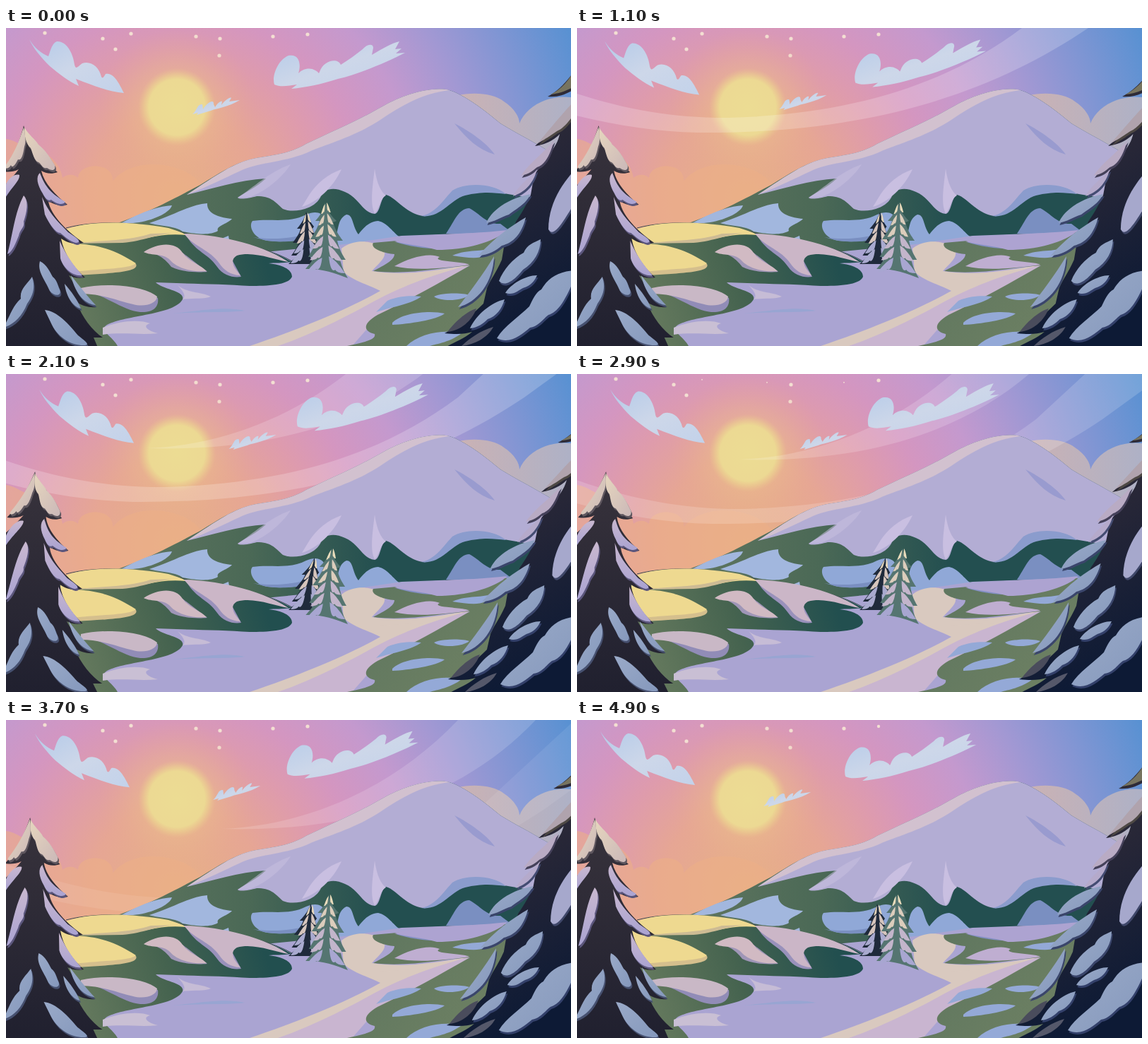
These frames come from a looping animation (800 by 450 pixels, 5 s). An HTML page:

```html
<!DOCTYPE html>
<html lang="en">
<head>
<meta charset="utf-8">
<title>Winter hills at sunset</title>
<style>
html, body { margin: 0; width: 100%; height: 100%; overflow: hidden; background: #c79bd0; }
svg { display: block; width: 100vw; height: 100vh; }
</style>
</head>
<body>
<svg viewBox="0 0 800 450" preserveAspectRatio="none">
<defs>
  <radialGradient id="sky" gradientUnits="userSpaceOnUse" cx="240" cy="240" r="610">
    <stop offset="0" stop-color="#e7b186"/><stop offset=".2" stop-color="#e6a694"/>
    <stop offset=".33" stop-color="#de9bad"/><stop offset=".43" stop-color="#d496c0"/>
    <stop offset=".56" stop-color="#c499ce"/><stop offset=".7" stop-color="#a298d3"/>
    <stop offset=".85" stop-color="#7d95d3"/><stop offset="1" stop-color="#5791d2"/>
  </radialGradient>
  <radialGradient id="sun">
    <stop offset="0" stop-color="#ecdc93"/><stop offset=".36" stop-color="#ecd993"/>
    <stop offset=".42" stop-color="#ecd08f" stop-opacity=".75"/>
    <stop offset=".5" stop-color="#ebbd8c" stop-opacity=".4"/>
    <stop offset="1" stop-color="#e8a990" stop-opacity="0"/>
  </radialGradient>
  <linearGradient id="cloud" x2="1" y2="1">
    <stop offset="0" stop-color="#b4cae9"/><stop offset=".5" stop-color="#cdd7e9"/><stop offset="1" stop-color="#c3d2ea"/>
  </linearGradient>
  <linearGradient id="haze" x2="1">
    <stop offset="0" stop-color="#cbb2b4"/><stop offset="1" stop-color="#aeb1c6"/>
  </linearGradient>
  <linearGradient id="wood" gradientUnits="userSpaceOnUse" x1="160" x2="620">
    <stop offset="0" stop-color="#5f755f"/><stop offset=".4" stop-color="#4b6956"/><stop offset=".8" stop-color="#234f50"/>
  </linearGradient>
  <linearGradient id="hill" gradientUnits="userSpaceOnUse" x1="100" y1="420" x2="370" y2="340">
    <stop offset="0" stop-color="#667a5e"/><stop offset=".5" stop-color="#45634f"/><stop offset="1" stop-color="#224f4f"/>
  </linearGradient>
  <linearGradient id="bank" x2="1" y2=".4">
    <stop offset="0" stop-color="#5d755f"/><stop offset="1" stop-color="#708263"/>
  </linearGradient>
  <linearGradient id="barkL" x2="0" y2="1">
    <stop offset="0" stop-color="#38333c"/><stop offset="1" stop-color="#20202f"/>
  </linearGradient>
  <linearGradient id="barkR" x2=".3" y2="1">
    <stop offset="0" stop-color="#3a3338"/><stop offset=".5" stop-color="#262637"/><stop offset="1" stop-color="#0d1a35"/>
  </linearGradient>
  <linearGradient id="cream" x2="1" y2="1">
    <stop offset="0" stop-color="#e6d6be"/><stop offset="1" stop-color="#cbb8b8"/>
  </linearGradient>
  <linearGradient id="lilac" x2="0" y2="1">
    <stop offset="0" stop-color="#c9b8cf"/><stop offset="1" stop-color="#aaa3d2"/>
  </linearGradient>
  <linearGradient id="ice" x2="1" y2="1">
    <stop offset="0" stop-color="#9aaac8"/><stop offset="1" stop-color="#8598bc"/>
  </linearGradient>
</defs>

<rect width="800" height="450" fill="url(#sky)"/>
<g id="stars" fill="#f3dfd2"></g>
<circle cx="242" cy="112" r="110" fill="url(#sun)"/>
<path fill="#edb088" opacity=".6" d="M0,157C12,158 20,166 30,169C58,174 76,188 80,212C88,206 96,207 102,212C103,200 117,194 132,196C146,198 152,208 151,217C162,202 185,192 212,193C245,195 268,208 276,222L160,290H0Z"/>
<path fill="url(#haze)" d="M638,96C660,90 690,92 705,104C720,114 727,126 727,135C736,112 766,94 800,98V190H740Z"/>
<g fill="#fff">
  <path id="windA" d="M-150,30C-20,95 90,128 215,127C400,122 530,75 630,0L760,-120H890L724,0C590,90 420,150 170,148C70,146 -40,120 -150,75Z"/>
  <path id="windB" d="M305,154C420,150 545,100 640,0L740,-130H840L750,0C660,95 520,160 305,154Z"/>
</g>
<g fill="url(#cloud)">
  <path class="cloud" d="M33,16C38,28 50,42 62,54C75,65 88,75 103,82L99,72C125,82 145,90 167,92C160,78 152,62 141,65C138,70 137,72 135,69C132,55 120,46 108,50C102,54 99,60 97,52C95,35 85,18 72,19C64,22 62,36 60,40C50,36 40,28 33,16Z"/>
  <path class="cloud" d="M380,80C376,68 385,45 400,39C416,36 418,52 414,64C420,58 430,55 438,60C444,63 442,66 444,62C450,45 470,42 474,52C485,45 495,38 505,30C512,22 520,22 520,28L518,38C535,28 545,22 557,19L551,30L560,29L552,36L565,35C540,48 500,65 470,72C445,80 425,84 404,86L412,80C400,82 388,84 380,80Z"/>
  <path class="cloud" d="M264,122C272,115 270,108 278,108L279,115C285,105 295,100 294,108L296,112C300,105 305,103 306,104L305,109C310,102 318,97 319,99L316,104L331,102C315,112 300,113 290,117L270,123L272,120Z"/>
</g>

<!-- mountain -->
<path fill="url(#wood)" d="M150,279C210,258 240,240 275,222C300,207 322,191 350,185C375,180 400,179 425,164C470,143 500,130 535,110C560,96 600,82 628,88C650,95 680,118 700,135C725,150 745,160 770,175L800,340H150Z"/>
<path fill="#b3add4" d="M256,236C300,207 322,191 350,185C375,180 400,179 425,164C470,143 500,130 535,110C560,96 600,82 628,88C650,95 680,118 700,135C725,150 745,160 770,175V245L705,234C690,222 650,222 635,232C620,248 605,268 590,266C565,262 550,238 538,236C530,240 530,262 522,263C505,262 500,240 480,232C465,225 450,226 445,240C435,258 405,262 392,256C380,245 375,238 355,238C345,241 330,243 328,240C340,232 355,225 368,213C330,215 290,228 256,236Z"/>
<path fill="#d2c1cf" d="M256,236C300,207 322,191 350,185C375,180 400,179 425,164C470,143 500,130 535,110C560,96 600,82 628,88C590,92 560,110 530,130C490,156 450,165 425,177C390,191 355,190 330,203C310,212 285,225 256,236Z"/>
<g fill="#c9bfe1">
  <path d="M475,200C455,207 440,220 430,235L419,253C440,247 463,226 475,200Z"/>
  <path d="M522,199C525,220 531,232 538,237C530,240 528,258 522,262C515,250 519,225 522,199Z"/>
  <path d="M328,240C350,226 372,204 403,193C390,213 365,233 345,239Z" opacity=".55"/>
</g>
<path fill="#999bcf" d="M635,135C655,145 680,162 692,179C668,172 653,157 635,135Z"/>
<path fill="#8b9ccd" d="M588,266C615,270 630,242 650,237C675,231 690,233 708,235C690,219 650,218 632,230C618,245 608,262 588,266Z"/>
<g fill="#a2b7de">
  <path d="M163,276C190,262 210,253 235,251C232,262 205,274 180,276Z"/>
  <path d="M203,276C240,264 260,250 285,248C284,262 300,268 320,270C314,277 297,280 300,287C288,295 262,290 250,288C240,280 215,280 203,276Z"/>
  <path d="M303,299L315,294L316,300Z"/>
</g>
<g fill="#90a8d7">
  <path d="M349,273C375,269 400,277 425,264C447,254 458,270 450,287C438,298 400,305 370,301C350,298 343,280 349,273Z"/>
  <path d="M460,308C474,290 466,272 482,264C492,264 490,280 499,292C506,282 516,273 527,273C541,276 548,290 558,296L520,308Z"/>
</g>
<path fill="#7a8fc1" d="M350,296C380,301 415,297 450,285C438,300 400,305 370,301ZM623,291C636,272 640,256 656,255C672,263 680,278 700,277L720,292Z"/>

<!-- valley -->
<path fill="#aaa4d2" d="M130,340L480,306L560,294L800,285V450H100Z"/>
<path fill="url(#hill)" d="M70,290C130,272 200,275 260,292C310,299 370,310 405,331C390,333 380,332 372,333C390,335 405,341 405,352C400,364 370,365 345,365C305,362 260,362 212,360C222,370 254,372 250,384C238,406 170,406 143,420C130,428 150,435 158,450H60Z"/>
<path fill="none" stroke="#3c4a50" d="M85,283C130,271 200,274 260,292C310,299 370,310 405,330"/>
<path fill="#d5bf8d" d="M72,308C120,302 155,314 184,334C190,346 145,347 100,350Z"/>
<path fill="#eed990" d="M80,287C110,273 170,272 230,283C240,286 252,290 255,293C220,289 195,300 165,303C135,304 120,302 95,305C130,306 155,314 184,333C175,341 140,340 95,345L72,320Z"/>
<path fill="#cdbb94" d="M95,305C140,300 175,301 205,291L245,290C215,290 195,302 165,304Z"/>
<path fill="#9f96b7" d="M195,318C215,316 228,330 234,338C250,346 272,346 285,345L250,318Z"/>
<path fill="#d1bac3" d="M195,317C215,304 240,302 250,318C258,330 275,335 284,344C260,346 240,338 232,328C222,318 207,323 195,317Z"/>
<path fill="#9991bb" d="M256,295C270,318 285,318 299,338C307,350 322,354 333,352L320,328Z"/>
<path fill="#cbb6c7" d="M252,291C290,292 355,302 400,331C380,328 350,315 327,322C313,330 328,345 332,350C318,350 308,342 302,333C288,313 266,310 252,291Z"/>
<path fill="#918cb7" d="M108,372C135,374 165,400 190,402C208,403 217,395 215,382L150,365Z"/>
<path fill="#c9b8c6" d="M106,368C140,360 195,364 214,380C213,391 195,395 180,391C155,385 135,376 106,376Z"/>
<path fill="#c6bcd6" d="M243,364C258,376 275,373 290,380C280,384 262,382 250,384C256,378 250,372 243,364Z"/>
<path fill="#98a5d2" d="M236,404C270,401 310,393 338,400C320,403 280,401 236,404Z"/>
<path fill="#c9bfd4" d="M137,424C160,414 190,412 204,418C190,422 205,430 215,432C190,435 165,430 137,434Z"/>
<path fill="#d9c9bf" d="M475,312C490,300 510,301 522,305C550,318 530,330 518,344C550,352 600,345 657,335C620,360 560,390 520,405C480,425 440,440 425,450H345C420,425 490,395 530,372C510,362 490,357 478,345Z"/>
<path fill="#c9b5d0" d="M657,335C600,350 555,368 515,390C465,418 415,440 385,450H490L525,410C570,385 615,365 657,335Z"/>
<path fill="url(#bank)" d="M520,304L700,288L800,300V450H483C500,446 525,442 522,433C508,430 502,420 526,406C570,385 615,360 657,336C620,338 570,350 520,344C530,338 550,330 550,320C535,319 515,312 520,304Z"/>
<path fill="#d9c9bf" d="M518,344C555,350 610,345 645,338L600,352L530,356Z"/>
<path fill="#8390c4" d="M552,303C590,315 650,320 705,291L620,300Z"/>
<path fill="#ada3d1" d="M550,302C590,289 640,294 710,286C690,304 650,314 610,314C590,308 570,307 550,302Z"/>
<path fill="#bfaed1" d="M550,337C570,325 600,317 614,324C600,331 650,330 656,335C620,340 580,344 550,337Z"/>
<g fill="#94a9d7">
  <path d="M547,417C560,403 600,399 621,404C610,413 570,419 547,420Z"/>
  <path d="M606,380C620,374 648,375 656,378C645,387 615,387 606,380Z"/>
  <path d="M567,450C585,432 620,426 645,432C630,444 610,447 600,450Z"/>
  <path d="M632,322C655,312 675,318 690,310C680,330 660,326 632,322Z"/>
  <path d="M540,386C558,378 578,379 588,380C575,390 550,394 524,402Z"/>
</g>
<g id="trees"></g>
</svg>

<script>
const NS = "http://www.w3.org/2000/svg", LOOP = 5000, STEP = 100;
const $ = s => document.querySelector(s);
const make = (tag, attrs, box) => {
  const el = document.createElementNS(NS, tag);
  for (const k in attrs) el.setAttribute(k, attrs[k]);
  return box.appendChild(el);
};

// x, y, time of the twinkle
const stars = [[55, 7, 4500], [137, 15, 1600], [155, 30, 1600], [177, 8, 2900], [269, 12, 2900],
  [303, 15, 1600], [302, 39, 4500], [378, 12, 2900], [427, 9, 4600]]
  .map(([cx, cy, at]) => ({ at, el: make("circle", { cx, cy }, $("#stars")) }));

const drift = [[15, 6], [35, -6], [55, -17]];
const clouds = document.querySelectorAll(".cloud");

// time, dx, dy, opacity
const gusts = {
  windA: [[100, -120, -190, .2], [700, -35, -47, .2], [1100, 0, 0, .2], [2100, 10, 33, .2],
    [2900, 20, 64, .16], [3700, 40, 125, .08], [4200, 60, 200, 0]],
  windB: [[1200, -320, -190, .17], [1700, -165, -82, .17], [2100, -105, -49, .17],
    [2900, -75, -33, .17], [3700, 0, 0, .15], [4300, 120, 100, 0]]
};

const C = "url(#cream)", L = "url(#lilac)", I = "url(#ice)";

// one drooping bough of snow, from its root to its tip
const bough = (x, y, dx, dy) =>
  `M${x},${y}Q${x + dx * .45},${y + dy * .2} ${x + dx},${y + dy}` +
  `Q${x + dx * .5},${y + dy} ${x + dx * .4},${y + dy * .8}Q${x + dx * .1},${y + dy} ${x},${y}Z`;

// rows of boughs widening downwards on both sides of a trunk
function boughs(n, x, top, height, width, fills) {
  const parts = [];
  for (let i = 0; i < n; i++) {
    const k = i / (n - 1), y = top + height * k, w = width * (.25 + .75 * k);
    const fill = fills[Math.round(k * (fills.length - 1))];
    parts.push([bough(x - w * .2, y, -w * .8, 14 + 6 * k), fill]);
    parts.push([bough(x + w * .15, y - 2, w * .85, 14 + 10 * k), fill]);
  }
  return parts;
}

// bend(y): sideways shift at full sway; parts: path, fill, shade
const trees = [
  { bend: y => 12 * (Math.max(0, 335 - y) / 75) ** 1.5, parts: [
    ["M425,260C428,270 432,276 436,281L434,284C438,296 442,302 446,306L440,312L446,334L400,334C406,328 409,326 412,322L404,322C410,314 413,308 415,304L406,304C413,294 416,290 417,284L412,284C420,275 423,268 425,260Z", "#1f2a3b"],
    ...boughs(5, 426, 263, 50, 23, ["#e4d5bb", "#d6c5bd", "#a9aacf"])
  ] },
  { bend: y => 9 * (Math.max(0, 353 - y) / 105) ** 1.5, parts: [
    ["M452,247C455,258 460,266 468,273L463,275C467,288 472,294 477,301L469,301C472,314 477,322 481,328L473,328C476,340 480,347 484,354C465,346 445,340 424,341C430,334 433,330 436,324L428,324C435,312 438,306 440,299L431,299C438,288 442,281 444,273L438,273C446,264 450,256 452,247Z", "#557571"],
    ...boughs(6, 453, 249, 76, 27, ["#e9dcbc", "#dccdbc", "#c3b5cb", "#a8a6d1"])
  ] },
  { bend: y => { const u = (450 - y) / 312; return 39 * u * (u - .58); }, parts: [
    ["M25,138C28,150 38,160 48,178C55,188 62,195 73,204C65,207 56,206 50,202C54,220 70,236 87,250C77,253 67,249 60,245C63,264 85,287 110,304C97,307 87,304 78,298C82,320 95,338 112,353C102,355 95,353 89,350C100,370 115,385 128,395C117,396 108,393 100,388C108,410 122,428 137,438L124,438L130,452L-30,452L-30,245C-8,230 6,216 18,200C10,204 3,204 -5,203C10,185 18,165 25,138Z", "url(#barkL)"],
    ["M25,140C27,152 29,160 26,168C24,180 22,188 17,186C13,194 9,199 7,194C4,200 -3,200 -1,195C10,180 18,163 25,140Z", C, "#5f575f"],
    ["M26,141C33,152 41,157 46,165C56,173 63,184 69,194C71,202 65,203 58,198C52,200 50,192 46,190C40,188 38,178 35,170C28,164 26,152 26,141Z", C, "#5f575f"],
    ["M-6,238C-2,217 10,205 19,208C20,216 8,225 -2,242Z", L],
    ["M2,320C10,290 12,262 25,237C33,245 29,262 25,274C27,282 20,284 18,294C14,304 9,317 2,320Z", L, "#5b567c"],
    ["M48,205C55,225 65,235 84,246C80,252 70,248 64,243C58,246 54,238 52,234C44,222 42,210 48,205Z", L, "#5b567c"],
    ["M51,239C62,265 75,275 88,289C100,297 109,303 99,304C90,302 82,294 77,290C70,290 62,278 55,264Z", L, "#5b567c"],
    ["M76,301C84,320 95,335 108,350C95,352 81,340 77,326Z", L, "#5b567c"],
    ["M48,330C58,335 62,345 66,352C72,356 73,364 76,370C80,380 68,380 62,372C55,355 44,345 48,330Z", I, "#46506f"],
    ["M92,350C104,365 118,383 127,392C114,391 99,380 92,350Z", I, "#46506f"],
    ["M83,362C92,372 102,386 106,397C95,395 85,380 83,362Z", I, "#46506f"],
    ["M37,352C30,362 19,370 21,383C8,395 6,408 -4,424C10,420 22,410 30,390C40,376 41,365 37,352Z", I, "#46506f"],
    ["M55,399C72,400 90,420 102,435C115,445 118,448 112,449C95,450 75,440 65,420Z", I, "#46506f"]
  ] },
  { bend: y => 5 + 10 * (Math.max(0, 450 - y) / 355) ** 4, parts: [
    ["M812,50C798,72 784,88 767,97C782,98 790,95 803,88L800,112C788,130 768,150 749,167C762,165 775,160 784,150C782,160 778,166 773,174C764,188 755,198 748,207L743,236C736,253 728,265 722,274C717,290 712,300 705,310L702,328C693,348 686,356 681,368L676,390C660,406 640,423 621,432C640,434 650,433 660,430C648,440 630,447 622,452L840,452L840,50Z", "url(#barkR)"],
    ["M803,62C796,76 784,88 771,94C784,93 796,88 806,82Z", "#77745f"],
    ["M806,102C794,114 774,138 753,163C766,156 774,150 780,146C788,143 796,134 806,120Z", "#b0a3ad", "#4d4844"],
    ["M776,159C760,178 742,190 729,209C740,207 746,202 752,197C762,194 770,182 776,159Z", "#b9abc4", "#45415a"],
    ["M752,200C742,212 725,223 718,238C734,232 746,222 752,200Z", "#b5aacb", "#444c72"],
    ["M743,235C735,251 720,257 712,264C700,268 692,274 680,276C688,256 715,240 743,235Z", I, "#3a456b"],
    ["M806,200C786,222 768,250 768,285C775,297 787,278 806,246Z", "#a6a8cc", "#3f4769"],
    ["M736,268C715,280 690,298 669,322C684,321 694,315 702,308C718,304 730,292 736,268Z", I, "#3a456b"],
    ["M757,299C747,304 738,306 733,318C718,326 704,342 698,358C708,369 724,352 732,342C748,332 757,316 757,299Z", I, "#3a456b"],
    ["M691,323C676,348 655,376 640,395C667,389 690,360 691,323Z", I, "#3a456b"],
    ["M752,350C735,350 714,363 707,375C718,379 726,371 732,368C744,364 748,358 752,350Z", I, "#33406a"],
    ["M706,384C688,388 666,405 657,425C668,424 676,418 682,412C694,408 702,398 706,384Z", I, "#33406a"],
    ["M666,397C650,402 634,418 625,430C644,428 660,414 666,397Z", "#4a4c5c"],
    ["M690,423C672,428 655,440 645,450C664,448 682,438 690,423Z", "#55586a"],
    ["M806,343C780,344 766,356 758,370C750,374 746,384 741,394C727,408 705,422 695,439C714,448 730,434 742,424C754,422 760,412 768,406C784,402 795,378 806,352Z", I, "#33406a"]
  ] }
];

for (const tree of trees) {
  tree.paths = [];
  for (const [d, fill, shade] of tree.parts) {
    if (shade) tree.paths.push({ d, el: make("path", { fill: shade, transform: "translate(1.5 3)" }, $("#trees")) });
    tree.paths.push({ d, el: make("path", { fill }, $("#trees")) });
  }
}

const sway = (d, bend, k) => d.replace(/(-?[\d.]+),(-?[\d.]+)/g,
  (_, x, y) => (+x + k * bend(+y)).toFixed(2) + "," + y);

function along(keys, t) {
  const i = keys.findIndex(k => k[0] > t);
  if (i < 1) return [0, 0, 0];
  const [a, b] = [keys[i - 1], keys[i]], p = (t - a[0]) / (b[0] - a[0]);
  return [1, 2, 3].map(n => a[n] + (b[n] - a[n]) * p);
}

function draw(t) {
  const p = 1 - Math.abs(1 - t / (LOOP / 2));
  const soft = (1 - Math.cos(Math.PI * p)) / 2;
  const cubic = p < .5 ? 4 * p ** 3 : 1 - 4 * (1 - p) ** 3;
  clouds.forEach((el, i) => el.setAttribute("transform", `translate(${drift[i].map(v => v * soft)})`));
  for (const { paths, bend } of trees)
    for (const { d, el } of paths) el.setAttribute("d", sway(d, bend, cubic));
  for (const id in gusts) {
    const [x, y, alpha] = along(gusts[id], t), el = $("#" + id);
    el.setAttribute("transform", `translate(${x} ${y})`);
    el.setAttribute("opacity", alpha);
  }
  for (const { at, el } of stars) {
    const near = Math.max(0, 1 - Math.abs(t - at) / 400);
    el.setAttribute("r", 2.6 - 1.7 * near);
  }
}

let start, last = -1;
function tick(now) {
  start ??= now;
  const t = Math.floor(((now - start) % LOOP) / STEP) * STEP;
  if (t !== last) draw(last = t);
  requestAnimationFrame(tick);
}
draw(0);
requestAnimationFrame(tick);
</script>
</body>
</html>
```
